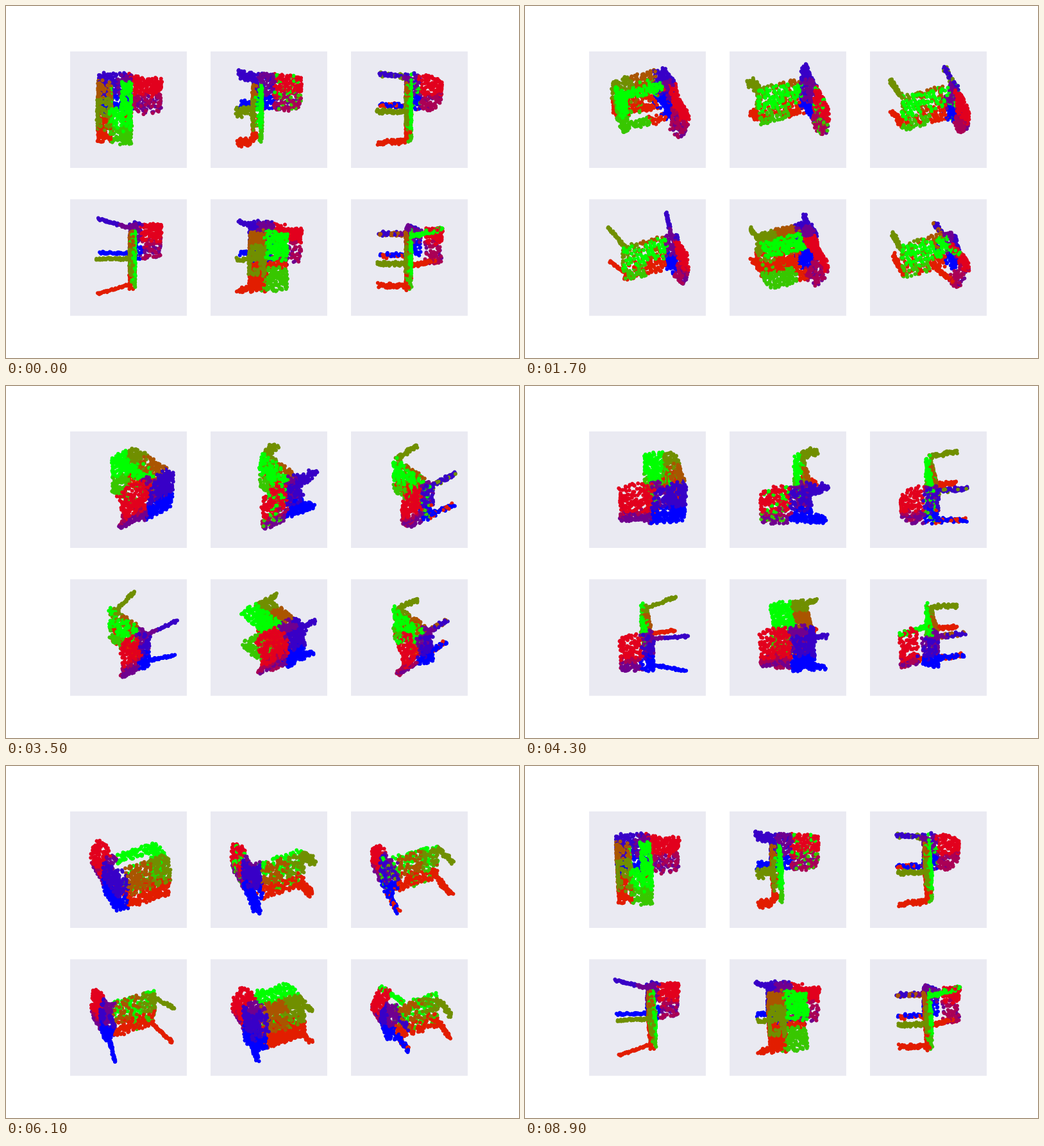
Write a matplotlib script that moves like this. It is 800x550 px and loops after 9000 ms.

```python
import numpy as np
import matplotlib.pyplot as plt
from matplotlib.animation import FuncAnimation

FRAMES, ELEV = 90, 40
HALF = 54.24                  # half side of the view box, about one pixel per unit
FLOOR, TOP = -50, 49          # y runs from the leg tips to the top of the back
W, D = 35, 42                 # half width (z) and half depth (x)
AREA = 33                     # surface area per point

rng = np.random.default_rng(7)
cmap = plt.get_cmap("brg")


def box(xs, ys, zs):
    """Evenly spread points on the surface of a box."""
    lo, hi = np.sort(np.array([xs, ys, zs], float), axis=1).T
    size = hi - lo
    area = size.prod() / size
    n = int(2 * area.sum() / AREA)
    golden = 1.2207440846 ** -np.arange(1, 4)
    p = lo + size * ((rng.random(3) + np.arange(n)[:, None] * golden) % 1)
    axis = rng.choice(3, n, p=area / area.sum())
    rows = np.arange(n)
    p[rows, axis] = np.where(rng.random(n) < 0.5, lo[axis], hi[axis])
    return p


def rod(a, b, w):
    a, b = np.array(a, float), np.array(b, float)
    n = int(np.linalg.norm(b - a) * (0.6 + w / 4))
    return np.linspace(a, b, n) + rng.uniform(-w, w, (n, 3)) * [1, 0.3, 1]


def mirrored(xs, ys, z0, z1):
    return [box(xs, ys, (s * z0, s * z1)) for s in (-1, 1)]


def bend_back(p, bend, taper, gap):
    """Round the upper corners, curve the sides forward, cut the gap."""
    x, y, z = p.T
    t = np.clip((y - 25) / (TOP - 25), 0, 1)
    z = z * np.sqrt(1 - taper * t ** 2)
    if gap:
        z = np.where(y < gap[0], 0.75 * z, z)
    x = x + bend * (z / W) ** 2 * np.clip(y / 20, 0, 1)
    return np.column_stack([x, y, z])


def paint(p, split, middle, rear, reach, fleck, stray):
    """Ten colour groups, from the rear legs (0) over the back to the seat (9)."""
    x, y, z = (p + rng.normal(0, [2, 2, 3.5], p.shape)).T
    swap = rng.random(len(p)) < np.where(y > split, fleck, stray)
    x = np.where(swap & (x < rear), -x, x)
    behind, left, top = x < rear, z > -5, y > middle
    back = behind & (y > split)
    outer = (p[:, 0] < -D) | (y < -20)
    return np.select(
        [back & left, back & outer & (z < -12), back,
         behind & left & outer, behind & left, behind,
         top & left, top & (x > reach), ~left, x < 15],
        [4, 2, 3, 1, 2, 0, 9, 8, 5, 6], 7)


def chair(seat, split, middle=None, arm=None, rail=False, slope=False,
          bend=4, taper=0.2, gap=None, tip=(46, -46, 32), pull=0.92, leg=2.8,
          rear=-27, reach=-5, fleck=0, stray=0):
    back = box((-D - 3, -D + 3), (seat[0], TOP), (-W, W))
    if gap:
        back = back[(back[:, 1] < gap[0]) | (back[:, 1] > gap[1])]
    parts = [box((4 - D, D + 2), seat, (-0.93 * W, 0.93 * W))]
    if arm:
        parts += mirrored((6 - D, D + 2), arm, W - 6, W)
    if rail:
        parts.append(box((D - 5, D + 2), (seat[1], arm[1]), (-W, W)))
    if slope:
        parts += [rod((-12, 2, s * 30), (-29, TOP, s * 32), 2.5)
                  for s in (-1, 1)]
    if seat[0] > FLOOR + 2:
        front, hind, z = tip
        for x in (front, hind):
            parts += [rod((x, FLOOR, s * z), (x * pull, seat[0], s * z * pull), leg)
                      for s in (-1, 1)]
    pts = np.vstack([back] + parts)
    middle = np.mean(seat) if middle is None else middle
    labels = paint(pts, split, middle, rear, reach, fleck, stray)
    pts[:len(back)] = bend_back(back, bend, taper, gap)
    return pts + rng.normal(0, 0.6, pts.shape), labels


CHAIRS = [
    chair((-49, -30), 2, middle=-29, arm=(-12, 1), rail=True, bend=12),
    chair((-27, -14), 5, leg=6, taper=0.4, fleck=0.2),
    chair((-7, 0), 14, taper=0.75, stray=0.2),
    chair((0, 7), 18, tip=(49, -50, 35), pull=0.75, leg=1.3, bend=6, reach=8),
    chair((-32, -10), 4, middle=-8, arm=(-30, 25), bend=20, rear=-20),
    chair((-7, 0), 20, slope=True, bend=20, gap=(17, 23),
          tip=(44, -28, 22), pull=1),
]

fig, axes = plt.subplots(2, 3, figsize=(8, 5.5), dpi=100,
                         subplot_kw={"projection": "3d"}, facecolor="white")
fig.subplots_adjust(left=0.125, right=0.9, bottom=0.11, top=0.88,
                    wspace=0.2, hspace=0.2)

for ax, (pts, labels) in zip(axes.flat, CHAIRS):
    ax.scatter(*pts.T, c=cmap(labels / 9), s=18.5, linewidths=0,
               depthshade=False)
    lim = (-HALF, HALF)
    ax.set(xlim=lim, ylim=lim, zlim=lim, facecolor="#EAEAF2")
    ax.set_box_aspect((1, 1, 1))
    ax.set_axis_off()


def update(i):
    for ax in axes.flat:
        ax.view_init(elev=ELEV, azim=360 * i / FRAMES)
    return []


anim = FuncAnimation(fig, update, frames=FRAMES, interval=100, repeat=True,
                     repeat_delay=0, blit=False)
plt.show()
```
